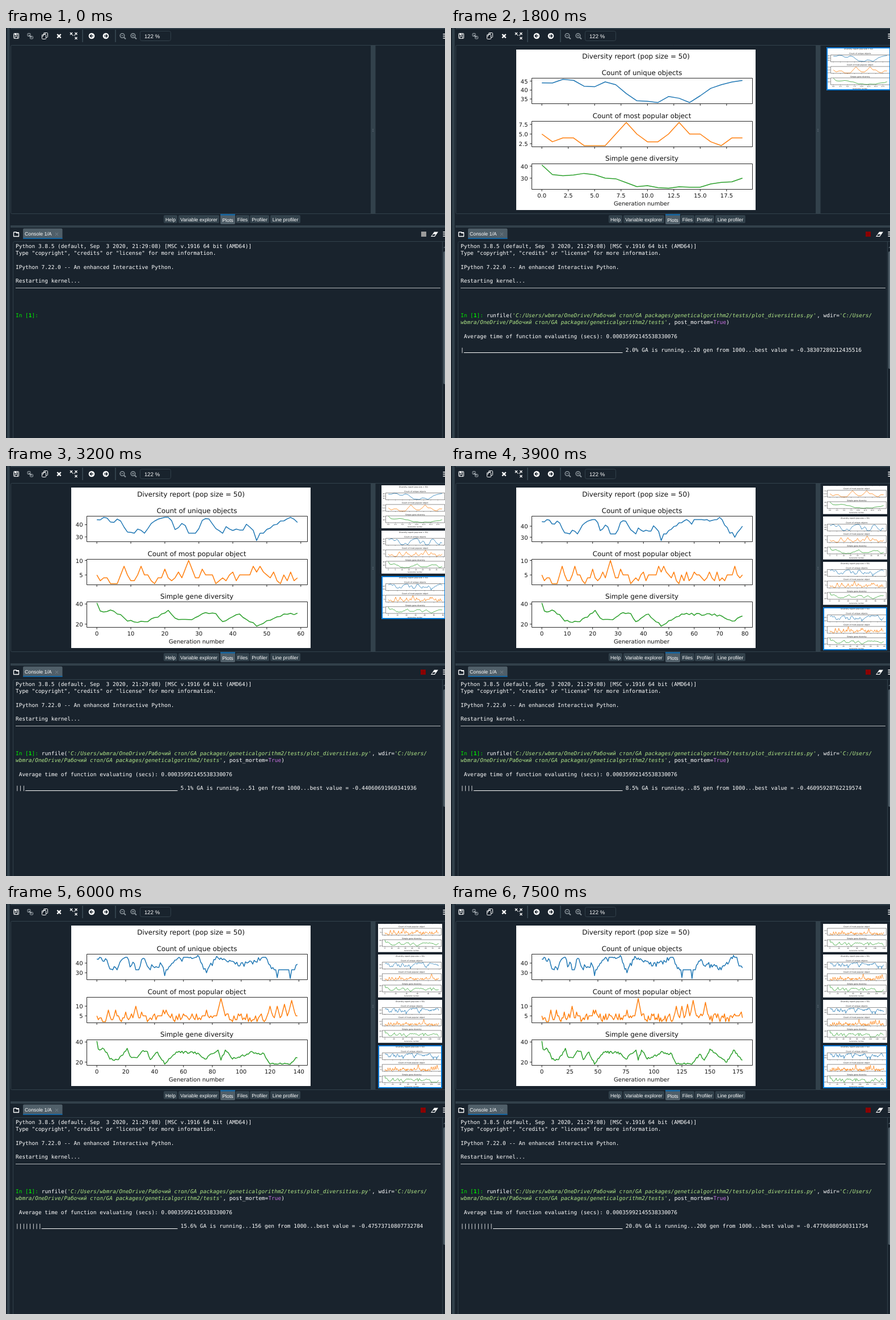
Recreate the animation shown at these times as an HTML page with a canvas. Size 774 by 723 pixels, loop 8000 ms.

```html
<!DOCTYPE html>
<html lang="en">
<head>
<meta charset="utf-8">
<title>Diversity plots</title>
<style>
html, body { margin: 0; width: 100%; height: 100%; overflow: hidden; background: #19232d; }
canvas { display: block; }
</style>
</head>
<body>
<canvas id="stage" width="774" height="723"></canvas>
<script>
const ctx = document.getElementById('stage').getContext('2d');
const LOOP = 8000;
const BG = '#19232d', LINE = '#32414b', LIGHT = '#505f69', BLUE = '#1464a0';
const WHITE = '#fff', INK = '#111';
const UI = '8.75px "Liberation Sans", Arial, sans-serif';
const MONO = '9.485px "DejaVu Sans Mono", monospace';
const PLOT = '"DejaVu Sans", sans-serif';
const CELL = 5.71, GENERATIONS = 180;

// ---- data
const noise = (i, seed) => {
  const v = Math.sin(i * 127.1 + seed * 311.7) * 43758.5453;
  return 2 * (v - Math.floor(v)) - 1;
};

// Line through [generation, value] pairs, with bounded jitter between them.
function trace(keys, amp, lo, hi) {
  const out = [keys[0][1]];
  for (let k = 1; k < keys.length; k++) {
    const [from, a] = keys[k - 1], [to, b] = keys[k];
    for (let i = from + 1; i < to; i++) {
      const v = a + (b - a) * (i - from) / (to - from) + amp * noise(i, amp);
      out.push(Math.min(hi, Math.max(lo, v)));
    }
    out.push(b);
  }
  return out;
}

// Low random floor with steep peaks.
function spikes(peaks) {
  return Array.from({ length: GENERATIONS }, (_, i) => {
    const floor = Math.round(4 + 2 * noise(i, 5));
    return Math.max(floor, ...peaks.map(([at, top]) => top - 3 * Math.abs(i - at)));
  });
}

const unique = trace([[0, 44], [2, 46], [7, 43], [9, 34], [14, 33], [17, 43], [21, 46], [23, 36],
  [25, 41], [27, 33], [29, 33], [32, 45], [36, 35], [45, 38], [47, 27], [54, 43], [70, 48], [76, 30],
  [83, 47], [99, 37], [117, 46], [125, 25], [134, 24], [140, 42], [160, 33], [171, 48], [179, 35]],
  3, 33, 46);

const popular = spikes([[8, 8], [13, 8], [20, 7], [27, 10], [31, 7], [46, 8], [48, 8], [76, 8],
  [86, 14], [120, 10], [125, 10], [130, 11], [135, 13], [146, 12], [178, 7]]);

const gene = trace([[0, 41], [2, 32], [4, 34], [7, 29.5], [9, 23], [15, 22.5], [21, 33.7], [23, 26],
  [28, 24.5], [32, 31.5], [35, 30.5], [37, 22.5], [42, 30], [47, 18], [55, 30], [70, 29], [75, 23],
  [84, 32], [86, 22], [89, 32], [94, 23], [108, 30], [116, 28], [120, 18], [134, 18], [141, 28],
  [145, 22], [150, 33], [165, 20], [171, 32], [179, 22]],
  1.2, 18, 33);

const panels = [
  { title: 'Count of unique objects', data: unique, color: '#1f77b4', y: 88.5, bins: 3 },
  { title: 'Count of most popular object', data: popular, color: '#ff7f0e', y: 164.5, bins: 3 },
  { title: 'Simple gene diversity', data: gene, color: '#2ca02c', y: 239.5, bins: 2.5 }
];

// ---- timeline: plot updates, and [time, generation, new best value]
const plotTimes = [1800, 2600, 3200, 3900, 4600, 5200, 6000, 6600, 7400];
const progress = [
  [1300, 20, '-0.38307289212435516'],
  [2000, 31],
  [2600, 42, '-0.44060691960341936'],
  [2700, 51],
  [3400, 73, '-0.46095928762219574'],
  [3900, 85],
  [4100, 93],
  [4700, 120, '-0.46593237907446324'],
  [5300, 138],
  [6000, 156, '-0.47573710807732784'],
  [6800, 176],
  [7500, 200, '-0.47706080500311754']
];

// ---- helpers
function rect(x, y, w, h, color) {
  ctx.fillStyle = color;
  ctx.fillRect(x, y, w, h);
}

function box(x, y, w, h, r, fill, stroke) {
  ctx.beginPath();
  ctx.roundRect(x, y, w, h, r);
  if (fill) { ctx.fillStyle = fill; ctx.fill(); }
  if (stroke) { ctx.strokeStyle = stroke; ctx.lineWidth = 1; ctx.stroke(); }
}

function text(str, x, y, font, color, align = 'left') {
  ctx.font = font;
  ctx.fillStyle = color;
  ctx.textAlign = align;
  ctx.fillText(str, x, y);
}

function path(color, width, ...lines) {
  ctx.strokeStyle = color;
  ctx.lineWidth = width;
  ctx.beginPath();
  for (const pts of lines) {
    ctx.moveTo(pts[0], pts[1]);
    for (let i = 2; i < pts.length; i += 2) ctx.lineTo(pts[i], pts[i + 1]);
  }
  ctx.stroke();
}

function poly(color, ...pts) {
  ctx.fillStyle = color;
  ctx.beginPath();
  for (let i = 0; i < pts.length; i += 2) ctx.lineTo(pts[i], pts[i + 1]);
  ctx.fill();
}

function cross(x, y, r, width, color) {
  path(color, width, [x - r, y - r, x + r, y + r], [x + r, y - r, x - r, y + r]);
}

// ---- window
function menuIcon(y) {
  for (let i = 0; i < 3; i++) rect(770.5, y + i * 3.6, 4, 1.5, WHITE);
}

function arrowIcon(x, dir) {
  ctx.fillStyle = WHITE;
  ctx.beginPath();
  ctx.arc(x, 14, 5.3, 0, 7);
  ctx.fill();
  path(BG, 1.5, [x - 3 * dir, 14, x + 2.6 * dir, 14], [x, 11.2, x + 2.8 * dir, 14, x, 16.8]);
}

function zoomIcon(x, plus) {
  const gray = '#89939a';
  ctx.beginPath();
  ctx.arc(x - 1, 13.5, 3.8, 0, 7);
  ctx.strokeStyle = gray;
  ctx.lineWidth = 1.5;
  ctx.stroke();
  path(gray, 2, [x + 2, 16.5, x + 5, 19.5]);
  path(gray, 1, [x - 3, 13.5, x + 1, 13.5]);
  if (plus) path(gray, 1, [x - 1, 11.5, x - 1, 15.5]);
}

function toolbar() {
  box(13.5, 9.5, 9, 9, 1, null, WHITE);
  rect(15, 9, 6, 4, WHITE);
  rect(18.5, 9.8, 1.5, 2.3, BG);
  rect(15, 14.5, 6, 4, WHITE);
  rect(16, 15.5, 4, 2.5, BG);

  const gray = '#a7afb5';
  box(38, 9.5, 5, 5, 1, null, gray);
  box(42.5, 14.5, 5, 4.5, 1, null, gray);
  path(gray, 1.2, [40, 12, 45.5, 17]);

  box(66.5, 8.5, 7, 8, 1, null, WHITE);
  box(63.5, 11.5, 7, 8, 1, BG, WHITE);
  path(WHITE, 1, [63.5, 14, 66, 14, 66, 11.5], [66.5, 11, 69, 11, 69, 8.5]);

  cross(93.5, 14.2, 3.2, 2.4, WHITE);
  for (const [x, y] of [[115, 10], [123.5, 10], [123.5, 18]]) cross(x, y, 2, 1.3, WHITE);
  path(WHITE, 1, [117, 13, 119, 13], [120, 13, 122, 13]);

  rect(134, 3, 2, 22, LINE);
  arrowIcon(151, -1);
  arrowIcon(176, 1);
  rect(192, 3, 2, 22, LINE);
  zoomIcon(206, false);
  zoomIcon(225, true);
  box(236.5, 5.5, 54, 17, 3, null, LINE);
  text('122 %', 244, 18, '9.6px "Liberation Sans", Arial, sans-serif', WHITE);
  menuIcon(10);
}

function tabs() {
  const items = [['Help', 278, 24], ['Variable explorer', 304, 72], ['Plots', 378, 26],
    ['Files', 405, 24], ['Profiler', 430, 34], ['Line profiler', 466, 53]];
  for (const [label, x, w] of items) {
    const on = label === 'Plots';
    box(x, on ? 328 : 330, w, on ? 18 : 14, 2, on ? LIGHT : LINE);
    if (on) rect(x, 328, w, 2.5, BLUE);
    text(label, x + w / 2, on ? 342 : 341, UI, WHITE, 'center');
  }
}

function consoleBar(busy) {
  path(WHITE, 1.3, [13.5, 360, 13.5, 367.5, 22.5, 367.5, 22.5, 361.5, 18.5, 361.5, 18.5, 360, 13.5, 360]);
  rect(18, 360, 5, 2, WHITE);
  box(30, 353.5, 69.5, 18.5, 2, LIGHT);
  rect(30, 370, 69.5, 2, BLUE);
  text('Console 1/A', 33, 366, UI, WHITE);
  cross(89.5, 363.5, 2.5, 1, '#788590');
  if (busy) rect(731, 359, 9, 9, '#8b0000');
  else rect(732, 359, 9, 9, '#9b9b9b');
  poly(WHITE, 749, 368, 755, 359.5, 762, 359.5, 756, 368);
  poly(BG, 750.8, 366.8, 753, 363.8, 757.5, 363.8, 755.3, 366.8);
  menuIcon(359);
}

function windowFrame(t) {
  rect(0, 0, 774, 723, BG);
  rect(2, 0, 4.5, 723, LINE);
  rect(8, 0, 766, 2, LINE);
  box(8.5, 30.5, 780, 297, 2, null, LINE);
  rect(643, 31, 8.5, 296, LINE);
  rect(646.5, 178, 1, 1.5, '#788590');
  rect(646.5, 181, 1, 1.5, '#788590');
  rect(8, 348, 766, 4, LINE);
  toolbar();
  tabs();
  consoleBar(t >= 800);
  box(12.5, 376.5, 780, 400, 3, null, LINE);
  rect(769, 377, 1, 346, LINE);
  poly(LIGHT, 771, 388, 774, 385, 774, 388);
  // the handle shrinks as output grows
  const outputs = [800, 1100, 1300].filter(at => at <= t).length;
  box(771, 394, 6, 234 - 9 * outputs, 2, LIGHT);
}

// ---- console
const column = n => 17 + n * CELL;
const baseline = line => 388 + line * 12.2;

function row(line, ...parts) {
  let col = 0;
  for (const [str, color = WHITE, style = ''] of parts) {
    text(str, column(col), baseline(line), style + ' ' + MONO, color);
    col += str.length;
  }
}

function progressLine(t) {
  const done = progress.filter(p => p[0] <= t);
  if (!done.length) return;
  const gen = done[done.length - 1][1];
  const best = done.filter(p => p[2]).pop()[2];
  const bars = Math.round(gen / 20);
  row(15, ['|'.repeat(bars).padEnd(51) +
    `${(gen / 10).toFixed(1)}% GA is running...${gen} gen from 1000...best value = ${best}`]);
  rect(column(bars), 572, (50 - bars) * CELL, 1, WHITE);
}

function consoleText(t) {
  const green = '#00e800', string = '#b0e686';
  row(0, ['Python 3.8.5 (default, Sep  3 2020, 21:29:08) [MSC v.1916 64 bit (AMD64)]']);
  row(1, ['Type "copyright", "credits" or "license" for more information.']);
  row(3, ['IPython 7.22.0 -- An enhanced Interactive Python.']);
  row(5, ['Restarting kernel...']);
  rect(17, 458, 749, 1, '#b4b8bb');
  const prompt = [['In [', green], ['1', green, 'bold'], [']: ', green]];
  row(10, ...prompt);
  if (t < 800) return;
  const dir = 'OneDrive/Рабочий стол/GA packages/geneticalgorithm2/tests';
  row(10, [' '.repeat(8)], ['runfile('],
    ["'C:/Users/wbmra/" + dir + "/plot_diversities.py'", string, 'italic'],
    [', wdir='], ["'C:/Users/", string, 'italic']);
  row(11, ['wbmra/' + dir + "'", string, 'italic'], [', post_mortem='], ['True', '#c670e0'], [')']);
  if (t < 1100) return;
  row(13, [' Average time of function evaluating (secs): 0.00035992145538330076']);
  progressLine(t);
}

// ---- plots
const pickStep = raw => [2.5, 5, 10, 20, 25].find(s => s >= raw);
const label = (v, step) => step === 2.5 ? v.toFixed(1) : String(v);

function drawPanel(panel, n, last, weight) {
  const font = '10px ' + PLOT;
  const left = 142.5, width = 389, height = 45, { y: top, data, color } = panel;
  const bottom = top + height;
  const shown = data.slice(0, n);
  const min = Math.min(...shown), max = Math.max(...shown);
  const px = i => left + width * (0.5 + (i / (n - 1) - 0.5) / 1.1);
  const py = v => top + height * (0.5 - ((v - min) / (max - min) - 0.5) / 1.1);

  text(panel.title, 336.5, top - 5.2, '11.9px ' + PLOT, INK, 'center');
  path(color, 1.5 * weight, shown.flatMap((v, i) => [px(i), py(v)]));
  ctx.strokeStyle = INK;
  ctx.lineWidth = 0.9 * weight;
  ctx.strokeRect(left, top, width, height);

  const xStep = pickStep(1.1 * (n - 1) / 9);
  for (let v = 0; px(v) <= left + width; v += xStep) {
    path(INK, 0.9 * weight, [px(v), bottom, px(v), bottom + 3.5]);
    if (last) text(label(v, xStep), px(v), bottom + 14.6, font, INK, 'center');
  }
  const yStep = pickStep(1.1 * (max - min) / panel.bins);
  const first = Math.ceil((min - (max - min) * 0.05) / yStep) * yStep;
  for (let v = first; py(v) >= top; v += yStep) {
    path(INK, 0.9 * weight, [left - 3.5, py(v), left, py(v)]);
    text(label(v, yStep), left - 7, py(v) + 4, font, INK, 'right');
  }
}

function drawPlot(n, x, y, width) {
  const scale = width / 422;
  ctx.save();
  ctx.translate(x, y);
  ctx.scale(scale, scale);
  ctx.translate(-115, -38);
  rect(115, 38, 422, 283, WHITE);
  text('Diversity report (pop size = 50)', 326, 54, '12px ' + PLOT, INK, 'center');
  // strokes stay visible when the plot is small
  panels.forEach((p, i) => drawPanel(p, n, i === 2, 1 / Math.sqrt(scale)));
  text('Generation number', 336, 313, '10px ' + PLOT, INK, 'center');
  ctx.restore();
}

function plots(t) {
  const count = plotTimes.filter(p => p <= t).length;
  if (!count) return;
  drawPlot(count * 20, 115, 38, 422);

  const scrolled = count > 3;
  const x = scrolled ? 656 : 662;
  ctx.save();
  ctx.beginPath();
  ctx.rect(652, scrolled ? 35 : 34, 122, 291);
  ctx.clip();
  for (let i = Math.max(0, count - 4); i < count; i++) {
    const y = scrolled ? 249 + 80 * (i - count + 1) : 34 + 80 * i;
    drawPlot((i + 1) * 20, x, y, 113);
    if (i === count - 1) {
      ctx.strokeStyle = '#0078d7';
      ctx.lineWidth = 2;
      ctx.strokeRect(x + 1, y + 1, 111, 74);
    }
  }
  ctx.restore();
}

function draw(t) {
  ctx.textRendering = 'geometricPrecision';
  ctx.lineJoin = 'round';
  windowFrame(t);
  consoleText(t);
  plots(t);
}

const start = performance.now();
function tick() {
  draw((performance.now() - start) % LOOP);
  requestAnimationFrame(tick);
}
tick();
</script>
</body>
</html>
```
